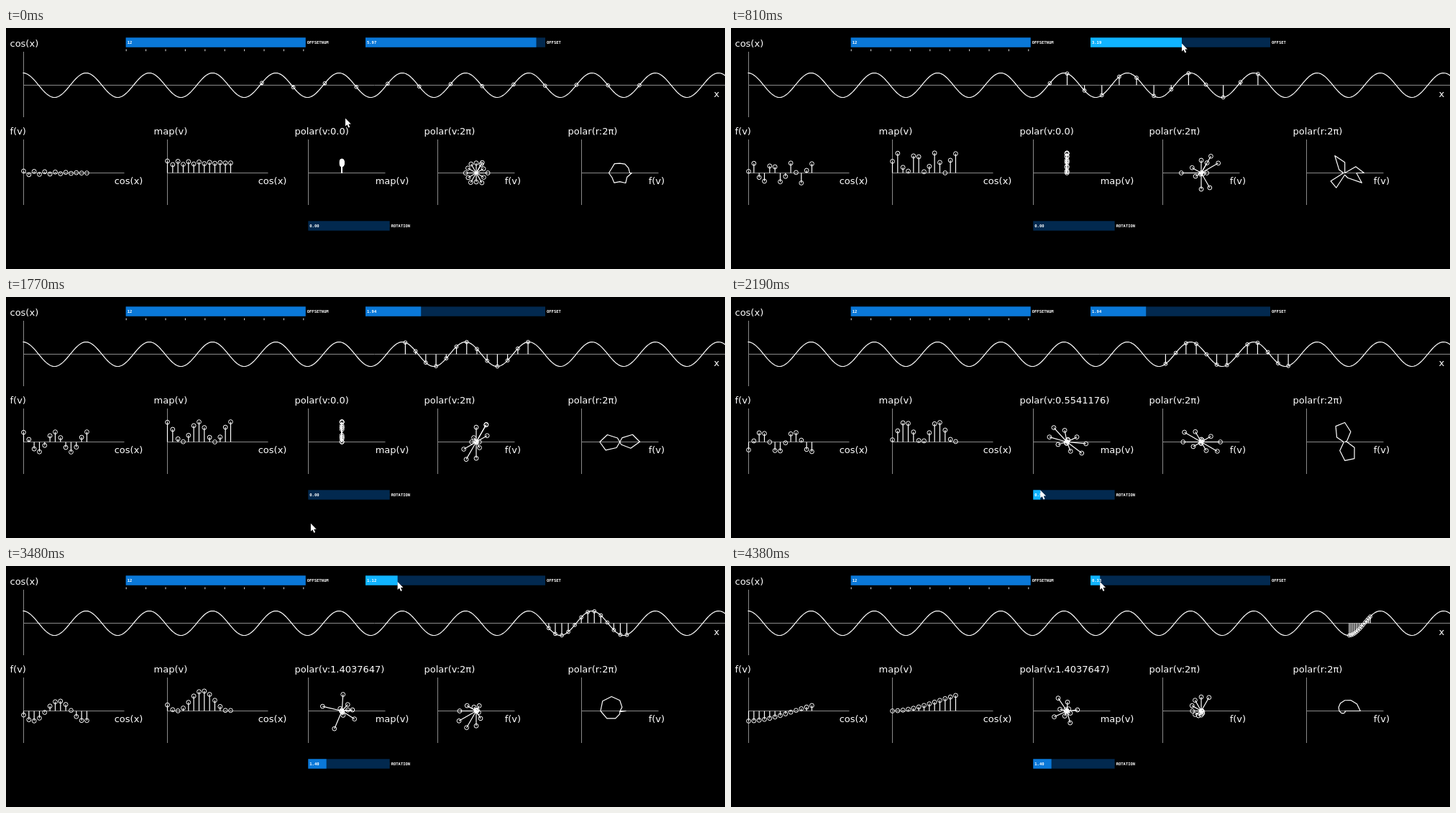
An HTML page with a canvas that plays this animation: 1000 px wide and 335 px high, repeating every 4.41 s.

```html
<!DOCTYPE html>
<html lang="en">
<head>
<meta charset="utf-8">
<title>Cosine sampling</title>
<style>
html, body { margin: 0; width: 100%; height: 100%; overflow: hidden; background: #000; }
canvas { display: block; }
</style>
</head>
<body>
<canvas id="stage" width="1000" height="335"></canvas>
<script>
const ctx = document.getElementById('stage').getContext('2d');
const TAU = Math.PI * 2;
const LOOP = 4410, STEP = 30, COUNT = 12;
const SLICE = TAU / COUNT;
const UNIT = 14;            // pixels per radian
const WAVE = { x: 23.4, y: 79.5, amp: 17 };
const BASE = 201.5;         // axis height of the lower plots
const BAR_H = 40 / 3;
const OFFSET_BAR = { x: 500, y: 13.4, w: 250 };
const ROT_BAR = { x: 420.3, y: 268.3, w: 340 / 3 };

// places where the pointer comes to rest
const stops = [
  { t: 0, x: 472, y: 125.5 },
  { t: 480, x: 737.5, y: 22 },
  { t: 820, x: 626.7, y: 21.5 },
  { t: 1110, x: 577.2, y: 22 },
  { t: 1260, x: 577.2, y: 22 },
  { t: 1740, x: 424, y: 316 },
  { t: 2040, x: 420.3, y: 272 },
  { t: 2190, x: 430.3, y: 268.5 },
  { t: 2400, x: 445.6, y: 269 },
  { t: 2760, x: 593.2, y: 24 },
  { t: 3210, x: 631, y: 23 },
  { t: 3490, x: 544.3, y: 22 },
  { t: 4290, x: 513.2, y: 22 }
];

const clamp = (v, lo, hi) => Math.min(hi, Math.max(lo, v));
const smooth = u => u * u * (3 - 2 * u);

function pointerAt(t) {
  const next = stops.findIndex((stop, i) => i > 0 && stop.t >= t);
  const b = next < 0 ? stops[stops.length - 1] : stops[next];
  const a = next < 0 ? b : stops[next - 1];
  const f = a === b ? 0 : smooth((t - a.t) / (b.t - a.t));
  return { x: a.x + (b.x - a.x) * f, y: a.y + (b.y - a.y) * f };
}

// a slider follows the pointer only while it is dragged
function offsetAt(t) {
  const held = t < 2760 ? clamp(t, 480, 1110) : t;
  return (pointerAt(held).x - OFFSET_BAR.x) / OFFSET_BAR.w * TAU;
}

function rotationAt(t) {
  const x = pointerAt(clamp(t, 2040, 2400)).x;
  return Math.round((x - ROT_BAR.x) * 3) * 6.28 / 340;
}

function phaseAt(t) {
  return t < 810 ? 23.75 + 6.25 * t / 810 : 30 + (t - 810) / 120;
}

function path(points, color = '#fff', width = 1.2, closed = false) {
  ctx.strokeStyle = color;
  ctx.lineWidth = width;
  ctx.lineJoin = 'round';
  ctx.beginPath();
  for (const [x, y] of points) ctx.lineTo(x, y);
  if (closed) ctx.closePath();
  ctx.stroke();
}

function pin(x0, y0, x1, y1, r = 2.9) {
  path([[x0, y0], [x1, y1]]);
  ctx.lineWidth = 1;
  ctx.beginPath();
  ctx.arc(x1, y1, r, 0, TAU);
  ctx.stroke();
}

function write(text, x, y, font = '13px "DejaVu Sans", sans-serif') {
  ctx.font = font;
  ctx.fillStyle = '#fff';
  ctx.fillText(text, x, y);
}

function axes(x, top, y, width) {
  path([[x, top], [x, top + 91]], '#8a8a8a', 1);
  path([[x, y], [x + width, y]], '#8a8a8a', 1);
}

function slider(name, { x, y, w }, share, value, mouse) {
  const tiny = 'bold 5.5px "DejaVu Sans Mono", monospace';
  const hot = mouse.x >= x - 1 && mouse.x <= x + w && mouse.y >= y && mouse.y <= y + BAR_H;
  ctx.fillStyle = '#02294f';
  ctx.fillRect(x, y, w, BAR_H);
  ctx.fillStyle = hot ? '#10b4ff' : '#0a78d8';
  ctx.fillRect(x, y, w * share, BAR_H);
  write(value, x + 2, y + 9, tiny);
  write(name, x + w + 2, y + 9, tiny);
}

function plot(title, axisName, x, width) {
  axes(x, 155, BASE, width);
  write(title, x - 19, 148);
  write(axisName, x + width - 13.8, 217);
}

function drawWave() {
  axes(24.5, 33, WAVE.y, 976);
  const points = [];
  for (let x = WAVE.x; x <= 1002; x += 2) {
    points.push([x, WAVE.y - WAVE.amp * Math.cos((x - WAVE.x) / UNIT)]);
  }
  path(points);
  write('cos(x)', 5.5, 26);
  write('x', 984.5, 96);
}

function drawPointer({ x, y }) {
  ctx.fillStyle = '#fff';
  ctx.beginPath();
  for (const [dx, dy] of [[0, 0], [0, 11], [2.5, 8.8], [4.4, 13], [6.2, 12.2], [4.4, 8.1], [7.8, 8]]) {
    ctx.lineTo(x + dx, y + dy);
  }
  ctx.fill();
}

function drawSamples(phase, spacing, rotation) {
  const outline = [];
  for (let i = 0; i <= COUNT; i++) {
    const angle = phase + i * spacing;
    const value = Math.cos(angle);
    const length = UNIT * (1 + value);
    const x = WAVE.x + UNIT * angle;
    const dx = i * UNIT * SLICE;
    const radial = (cx, a) =>
      pin(cx, BASE, cx + length * Math.sin(a), BASE - length * Math.cos(a));

    pin(x, WAVE.y, x, WAVE.y - WAVE.amp * value, 2.4);
    pin(24.5 + dx, BASE, 24.5 + dx, BASE - UNIT * value);
    pin(224.5 + dx, BASE, 224.5 + dx, BASE - length);
    radial(467.2, (i + 1) * rotation);
    radial(654, (i + 1) * SLICE);
    outline.push([853.7 + length * Math.cos(i * SLICE), BASE + length * Math.sin(i * SLICE)]);
  }
  path(outline, '#fff', 1.2, true);
}

function draw(t) {
  const mouse = pointerAt(t);
  const offset = offsetAt(t), rotation = rotationAt(t);
  const rotText = rotation ? Math.fround(rotation).toFixed(7) : '0.0';

  ctx.fillStyle = '#000';
  ctx.fillRect(0, 0, 1000, 335);
  drawWave();
  plot('f(v)', 'cos(x)', 24.5, 140);
  plot('map(v)', 'cos(x)', 224.5, 140);
  plot(`polar(v:${rotText})`, 'map(v)', 420.5, 107);
  plot('polar(v:2π)', 'f(v)', 600.5, 107);
  plot('polar(r:2π)', 'f(v)', 800.5, 107);

  // the samples trail the slider by one step
  drawSamples(phaseAt(t), offsetAt(t - STEP) * SLICE, rotation);

  slider('OFFSETNUM', { x: 166.7, y: 13.4, w: 250 }, 1, '12', mouse);
  ctx.fillStyle = '#ddd';
  for (let i = 0; i < 10; i++) ctx.fillRect(166.7 + i * 27.4, 29.5, 1, 2.7);
  slider('OFFSET', OFFSET_BAR, offset / TAU, offset.toFixed(2), mouse);
  slider('ROTATION', ROT_BAR, rotation / 6.28, rotation.toFixed(2), mouse);
  drawPointer(mouse);
}

const start = performance.now();
function tick(now) {
  const t = Math.max(0, now - start) % LOOP;
  draw(Math.floor(t / STEP) * STEP);
  requestAnimationFrame(tick);
}
tick(start);
</script>
</body>
</html>
```
